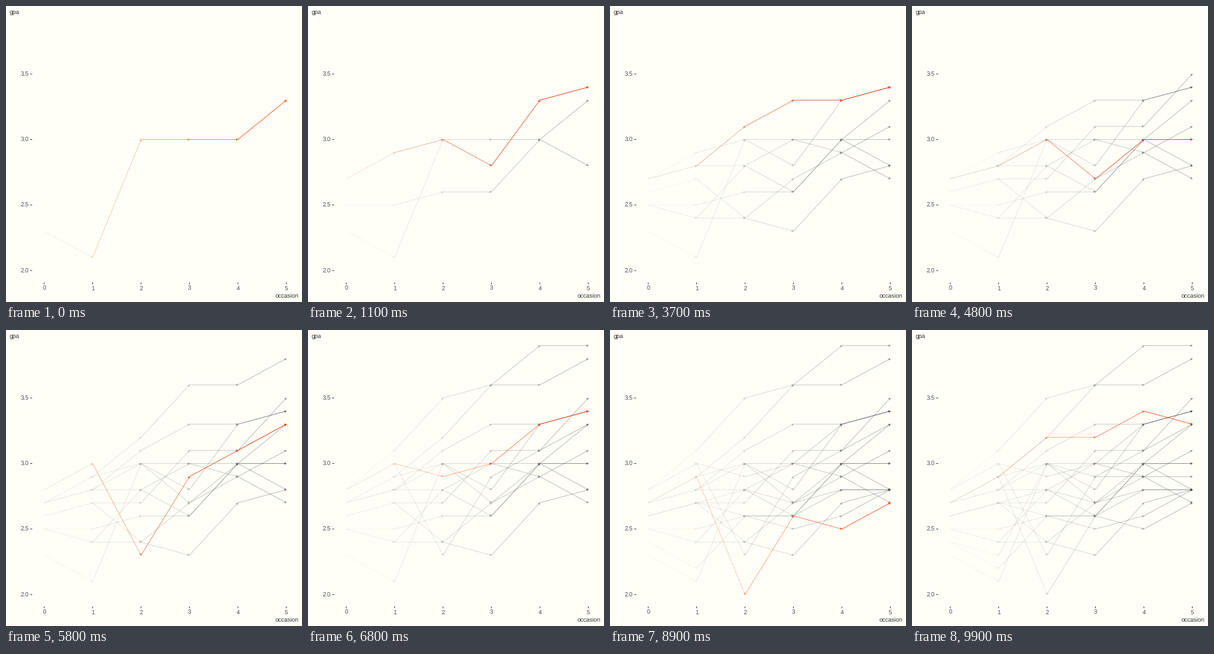
Write a matplotlib script that moves like this. It is 480x480 px and loops after 10 s.

```python
import numpy as np
import matplotlib.pyplot as plt
from matplotlib.animation import FuncAnimation
from matplotlib.collections import LineCollection, PolyCollection
from matplotlib.colors import to_rgb

plt.rcParams.update({"text.hinting": "none", "font.size": 9.6,
                     "font.family": "Liberation Sans"})

SIZE, FRAMES, INTERVAL = 480, 100, 100
PAPER, INK, TICK = "#FFFFF8", "#4D4D4D", "#333333"
ACTIVE, PAST, PAST_FADE = "#FF400A", "#404040", 0.42
HEAD_LENGTH, HEAD_WIDTH = 2.6, 1.5
OCCASIONS = np.arange(6)
ALPHAS = np.linspace(0.1, 1, 6)[:5]

# Turning points in tenths for occasions 1 to 5; gaps lie on a straight run.
_ = np.nan
TURNS = [
    (21, 30, _, 30, 33), (25, _, 26, 30, 28), (29, 30, 28, 33, 34),
    (27, 24, _, 29, 27), (28, 28, 30, 29, 31), (24, _, 23, 27, 28),
    (24, 28, 26, 30, 30), (28, _, 33, 33, 34), (27, 27, 31, 31, 35),
    (28, 30, 27, 30, 30), (29, 32, 36, 36, 38), (30, 23, 29, _, 33),
    (31, 35, 36, 39, 39), (30, 29, 30, 33, 34), (27, 26, 26, 28, 28),
    (27, 28, 27, 28, 28), (22, 26, 25, 26, 28), (29, 20, 26, 25, 27),
    (23, 30, 29, _, 29), (29, 32, 32, 34, 33),
]
STARTS = np.round(np.linspace(0, FRAMES - 1, len(TURNS))).astype(int)


def grades_from(turns):
    """Start halfway to 2.5, fill the gaps, round to tenths."""
    keys = np.array([(25 + turns[0]) / 2, *turns])
    known = ~np.isnan(keys)
    filled = np.interp(OCCASIONS, OCCASIONS[known], keys[known])
    return np.floor(filled + 0.5) / 10


def x_at(occasion):
    return 62 + 78.5 * occasion


def y_at(grade):
    return 216.5 - 212.5 * (grade - 3)


fig = plt.figure(figsize=(SIZE / 72, SIZE / 72), dpi=72, facecolor=PAPER)
ax = fig.add_axes([0, 0, 1, 1])
ax.set_xlim(0, SIZE)
ax.set_ylim(SIZE, 0)
ax.axis("off")


def label(x, y, text, align, color=INK):
    ax.text(x, y, text, ha=align, va="baseline", color=color)


def tick(xs, ys):
    ax.plot(xs, ys, color=TICK, lw=1.07, solid_capstyle="butt", snap=False)


def draw_axes():
    for grade in np.arange(2, 4, 0.5):
        y = y_at(grade)
        tick([39.4, 42.4], [y, y])
        label(37.4, y + 3.5, f"{grade:.1f}", "right")
    for occasion in OCCASIONS:
        x = x_at(occasion)
        tick([x, x], [448.4, 451.2])
        label(x, 461, str(occasion), "center")
    label(5.2, 13, "gpa", "left", TICK)
    label(474.6, 473, "occasion", "right", TICK)


def arrow_head(start, tip):
    along = (tip - start) / np.hypot(*(tip - start))
    across = np.array([-along[1], along[0]]) * HEAD_WIDTH
    base = tip - along * HEAD_LENGTH
    return [base + across, tip, base - across]


def student_path(grades, color, fade, zorder):
    """Segments with arrow heads that grow stronger with each occasion."""
    points = np.column_stack([x_at(OCCASIONS), y_at(grades)])
    pairs = list(zip(points[:-1], points[1:]))
    colors = [(*to_rgb(color), a * fade) for a in ALPHAS]
    parts = [
        LineCollection(pairs, colors=colors, linewidths=1.0, zorder=zorder),
        PolyCollection([arrow_head(a, b) for a, b in pairs],
                       facecolors=colors, edgecolors=colors,
                       linewidths=0.8, joinstyle="round", zorder=zorder),
    ]
    for part in parts:
        part.set_snap(False)
        part.set_visible(False)
        ax.add_collection(part, autolim=False)
    return parts


def show(parts, visible):
    for part in parts:
        part.set_visible(visible)


draw_axes()
students = [grades_from(turns) for turns in TURNS]
past = [student_path(g, PAST, PAST_FADE, 3) for g in students]
active = [student_path(g, ACTIVE, 1, 4) for g in students]


def update(frame):
    current = np.searchsorted(STARTS, frame, side="right") - 1
    for i, start in enumerate(STARTS):
        show(past[i], start < frame)
        show(active[i], i == current)
    return []


anim = FuncAnimation(fig, update, frames=FRAMES, interval=INTERVAL,
                     init_func=lambda: update(0), repeat=True,
                     repeat_delay=0, blit=False)
plt.show()
```
